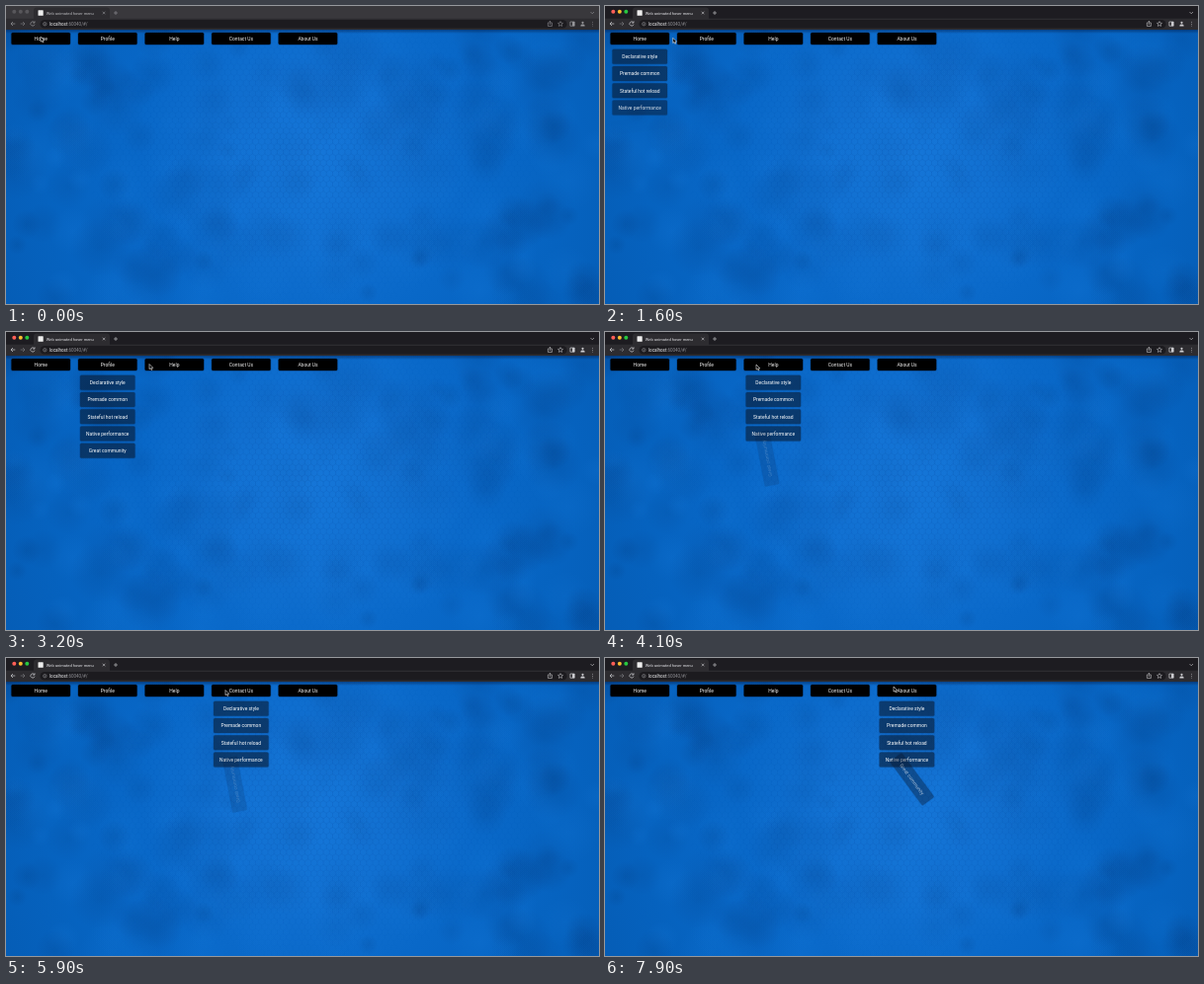
An HTML page with a canvas that plays this animation: 600x302 px, repeating every 8 s.

```html
<!DOCTYPE html>
<html lang="en">
<head>
<meta charset="utf-8">
<title>Animated hover menu</title>
<style>
html, body { margin: 0; width: 100%; height: 100%; overflow: hidden; background: #0862be; }
canvas { display: block; width: 600px; height: 302px; }
</style>
</head>
<body>
<canvas id="stage"></canvas>
<script>
const W = 600, H = 302, LOOP = 8000, TOP = 24;
const STEP = 190, SPIN = 175, FADE = 230;
const MENUS = ['Home', 'Profile', 'Help', 'Contact Us', 'About Us'];
const ITEMS = ['Declarative style', 'Premade common', 'Stateful hot reload',
  'Native performance', 'Great community'];
const OPENS = [837, 1672, 3292, 5092, 6992];
// pointer path: time, x, y
const POINTER = [[0, 35, 31], [100, 34, 31.5], [700, 34, 31.5], [1000, 44, 30], [1400, 56, 31],
  [1700, 75, 33], [2100, 85, 32.5], [2800, 94, 33], [3200, 145, 32.5], [3500, 151, 33],
  [4100, 153, 33], [4600, 160, 33], [5100, 214, 33], [5400, 220, 33], [5900, 222, 32.5],
  [6500, 228, 32], [7000, 277, 30], [7300, 290, 29], [7800, 292, 29], [8000, 292, 29]];

const dpr = window.devicePixelRatio || 1;
function surface(canvas) {
  canvas.width = W * dpr;
  canvas.height = H * dpr;
  const c = canvas.getContext('2d');
  c.scale(dpr, dpr);
  return c;
}
const g = surface(document.getElementById('stage'));
const backdrop = document.createElement('canvas');
paintBackdrop(surface(backdrop));

function paintBackdrop(c) {
  let seed = 11;
  const rnd = () => (seed = seed * 16807 % 2147483647) / 2147483647;
  const glow = (x, y, r, stops) => {
    const fill = c.createRadialGradient(x, y, 0, x, y, r);
    stops.forEach((s, i) => fill.addColorStop(i / (stops.length - 1), s));
    c.fillStyle = fill;
    c.fillRect(0, TOP, W, H);
  };
  glow(310, 155, 345, ['#1576d8', '#1170d1', '#0968c8', '#0663c0', '#055db6']);
  for (let i = 0; i < 230; i++) {
    const x = rnd() * W, y = TOP + rnd() * (H - TOP);
    const far = Math.min(1, Math.hypot(x - 310, (y - 155) * 1.2) / 230);
    const tone = rnd() < .62 ? '0,45,105' : '25,130,230';
    const a = (.04 + .13 * far) * (.5 + rnd() * .5);
    glow(x, y, 10 + rnd() * 24, [`rgba(${tone},${a})`, `rgba(${tone},${a * .55})`, `rgba(${tone},0)`]);
  }
  // honeycomb, fading away from the middle
  const r = 3.6, dx = r * Math.sqrt(3);
  c.lineWidth = .6;
  for (let row = 0; row < 52; row++) {
    for (let col = 0; col < 98; col++) {
      const x = (col + row % 2 / 2) * dx, y = TOP + row * r * 1.5;
      const d = Math.hypot((x - 310) / 250, (y - 155) / 165);
      const a = .15 * (1 - d);
      if (a <= 0) continue;
      c.strokeStyle = `rgba(0,45,110,${a})`;
      c.beginPath();
      c.moveTo(x - dx / 2, y - r / 2);
      c.lineTo(x, y - r);
      c.lineTo(x + dx / 2, y - r / 2);
      c.lineTo(x + dx / 2, y + r / 2);
      c.stroke();
    }
  }
  const edge = c.createLinearGradient(0, TOP, 0, TOP + 4);
  edge.addColorStop(0, 'rgba(0,20,60,.45)');
  edge.addColorStop(1, 'rgba(0,20,60,0)');
  c.fillStyle = edge;
  c.fillRect(0, TOP, W, 4);
}

function box(x, y, w, h, r, color) {
  g.fillStyle = color;
  g.beginPath();
  g.roundRect(x, y, w, h, r);
  g.fill();
}
function dot(x, y, r, color) {
  g.fillStyle = color;
  g.beginPath();
  g.arc(x, y, r, 0, 7);
  g.fill();
}
function text(s, x, y, size, color, align = 'left') {
  g.font = `${size}px Roboto, Arial, sans-serif`;
  g.textAlign = align;
  g.textBaseline = 'alphabetic';
  g.fillStyle = color;
  g.fillText(s, x, y);
  return g.measureText(s).width;
}
function line(d, color, width = .7) {
  g.strokeStyle = color;
  g.lineWidth = width;
  g.stroke(new Path2D(d));
}
function mix(a, b, k) {
  return `rgb(${a.map((v, i) => v + (b[i] - v) * k)})`;
}

function drawBrowser(active) {
  const bar = '#2d2c30', icon = mix([150, 150, 154], [205, 205, 209], active);
  g.fillStyle = mix([57, 56, 60], [29, 28, 33], active);
  g.fillRect(0, 0, W, 13);
  g.fillStyle = bar;
  g.fillRect(0, 12.7, W, TOP - 12.7);
  box(28, 1.5, 77, 12, [3, 3, 0, 0], bar);
  [[254, 95, 87], [254, 188, 46], [40, 200, 64]].forEach((color, i) =>
    dot(8.3 + i * 6.5, 5.8, 2, mix([88, 87, 91], color, active)));
  box(32.5, 4.2, 5.2, 5.6, .6, '#eeeeee');
  text('Web animated hover menu', 40.8, 8.6, 4.05, mix([190, 190, 194], [232, 232, 236], active));
  line('M97.8 5.7l2.6 2.6m0-2.6l-2.6 2.6M109 7h4M111 5v4M591.5 6l1.7 1.8L595 6', icon, .6);

  line('M9.3 18H5m2-2l-2 2 2 2', icon);
  line('M14.7 18H19m-2-2l2 2-2 2', '#77777b');
  line('M28.6 16.6A2.1 2.1 0 1 0 29 18.6M29 15.3v1.8h-1.8', icon);
  box(34.5, 14, 533, 8.6, 4.3, '#1c1b1f');
  g.strokeStyle = '#a5a5a9';
  g.lineWidth = .5;
  g.beginPath();
  g.arc(39.3, 18.2, 1.7, 0, 7);
  g.stroke();
  line('M39.3 17.9v1.3M39.3 17v.4', '#a5a5a9', .5);
  const w = text('localhost', 44, 19.8, 4.5, '#f0f0f2');
  text(':60040/#/', 44 + w, 19.8, 4.5, '#919196');
  line('M549.4 17h-1v3.4h4V17h-1M550.4 19v-3.6m-1.2 1.1l1.2-1.2 1.2 1.2', icon, .6);
  line('M561 15.6l.75 1.6 1.75.2-1.3 1.2.35 1.8-1.55-.9-1.55.9.35-1.8-1.3-1.2 1.75-.2z', icon, .55);
  line('M570.9 16h4.3v4.2h-4.3z', icon, .7);
  box(573, 16, 2.2, 4.2, 0, icon);
  dot(583.5, 16.8, 1.1, icon);
  box(581.4, 18.5, 4.2, 2, [1.5, 1.5, 0, 0], icon);
  [16.3, 18.2, 20.1].forEach(y => dot(593.5, y, .45, icon));
}

function drawItem(label, x, y, age) {
  const turn = Math.max(0, 1 - age / SPIN) * Math.PI * 2;
  const pivot = 6.5;
  g.save();
  g.globalAlpha = Math.min(1, age / FADE);
  g.translate(x, y + pivot);
  g.rotate(turn);
  g.translate(0, -pivot);
  box(-28.4, -8.1, 56.8, 16.2, 2, 'rgba(0,20,50,.16)');
  box(-27.8, -7.5, 55.6, 15, 1.5, 'rgba(10,24,44,.5)');
  text(label, 0, 1.8, 4.95, '#ffffff', 'center');
  g.restore();
}

function drawPointer(t) {
  const i = POINTER.findIndex(p => p[0] > t);
  const [t0, x0, y0] = POINTER[i - 1], [t1, x1, y1] = POINTER[i];
  const k = (t - t0) / (t1 - t0);
  g.save();
  g.translate(x0 + (x1 - x0) * k, y0 + (y1 - y0) * k);
  const arrow = new Path2D('M0 0V5.2L1.2 4.1 2.1 6 3 5.6 2.2 3.8H3.8Z');
  g.fillStyle = '#000';
  g.fill(arrow);
  g.strokeStyle = '#fff';
  g.lineWidth = .55;
  g.stroke(arrow);
  g.restore();
}

function draw(t) {
  g.drawImage(backdrop, 0, 0, W, H);
  drawBrowser(t < 300 ? 0 : t < 400 ? .5 : 1);
  MENUS.forEach((name, i) => {
    const x = 5.5 + i * 67.55;
    box(x - .6, 26.4, 60.7, 13.4, 2, 'rgba(0,15,45,.35)');
    box(x, 27, 59.5, 12, 1.5, '#000');
    text(name, x + 29.75, 34.7, 4.95, '#f5f5f5', 'center');
  });
  const open = OPENS.filter(s => s <= t).length - 1;
  if (open >= 0) {
    ITEMS.forEach((label, i) => {
      const age = t - OPENS[open] - i * STEP;
      if (age > 0) drawItem(label, 35.2 + open * 67.55, 51.3 + i * 17.25, age);
    });
  }
  drawPointer(t);
}

function tick() {
  draw(performance.now() % LOOP);
  requestAnimationFrame(tick);
}
tick();
</script>
</body>
</html>
```
